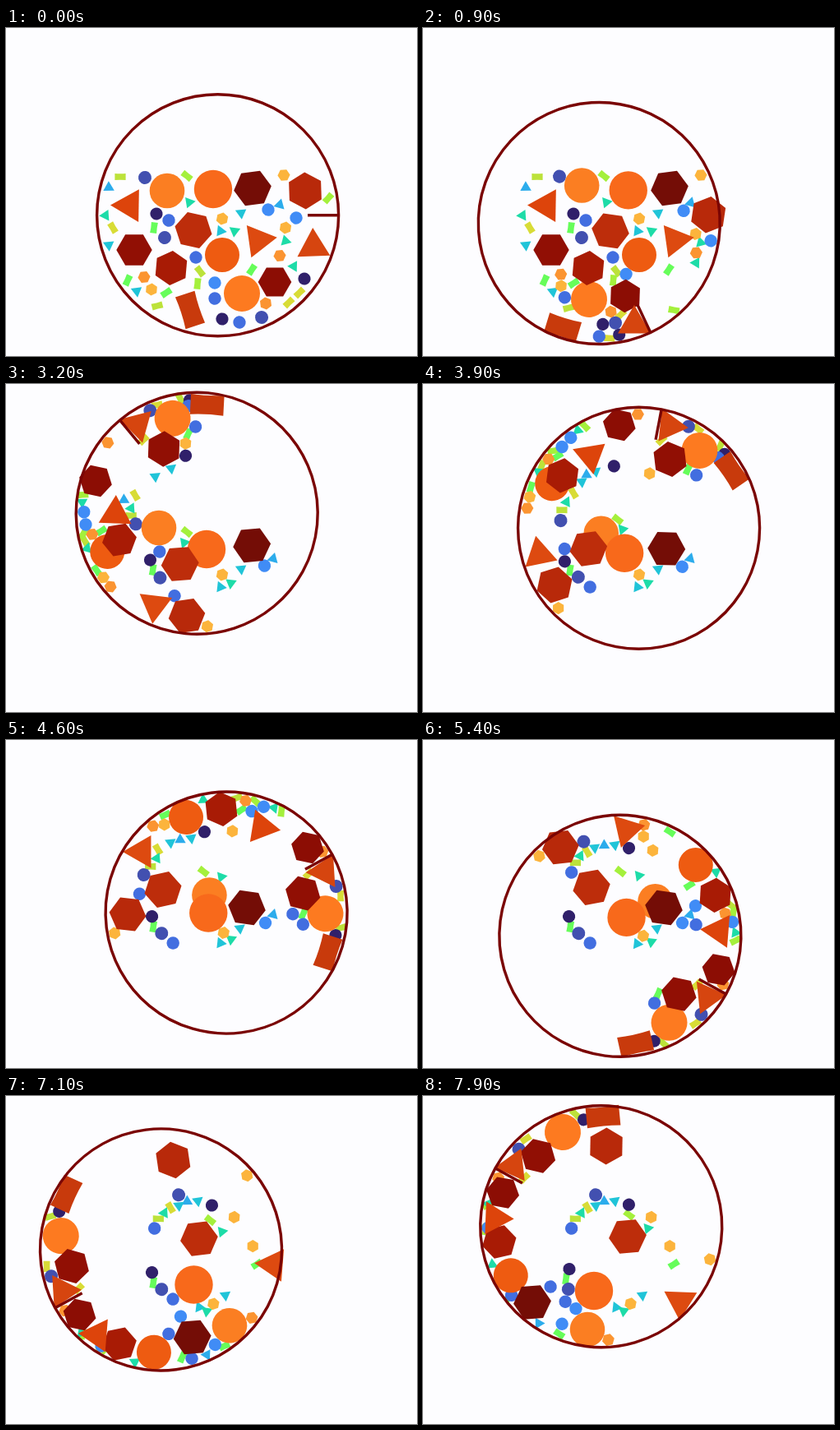
Write an HTML page that moves like this. It is 500 by 399 pixels and loops after 8 s.

```html
<!DOCTYPE html>
<html lang="en">
<head>
<meta charset="utf-8">
<title>Rotating drum</title>
<style>
html, body { margin: 0; width: 100%; height: 100%; overflow: hidden; background: #fdfdff; }
svg { display: block; width: 100vw; height: 100vh; }
</style>
</head>
<body>
<svg viewBox="0 0 500 399">
  <g id="bodies"></g>
  <g id="drum" fill="none" stroke="#7a0403" stroke-width="3.4">
    <circle cx="257.6" cy="227.8" r="147"/>
    <path d="M367 227.8H404"/>
  </g>
</svg>
<script>
const DURATION = 8, FRAME = 0.1, SUBSTEPS = 5; // seconds
const SPIN = 72; // degrees per second
const PIVOT = { x: 228.3, y: 198.5 };
const ORBIT = 41.5, INNER = 145.3, PADDLE = [110, 146];
const RAD = Math.PI / 180;

const clamp = (v, lo, hi) => Math.min(hi, Math.max(lo, v));
const wrap = (v, span) => v - span * Math.round(v / span);
const mix = (a, b, k) => a + (b - a) * k;
const around = (c, r, deg) => ({ x: c.x + r * Math.cos(deg * RAD), y: c.y + r * Math.sin(deg * RAD) });
const drumCentre = t => around(PIVOT, ORBIT, 45 + SPIN * t);

let seed = 7;
function random() {
  seed = seed * 16807 % 2147483647;
  return seed / 2147483647;
}

function polar(p) {
  const dx = p.x - PIVOT.x, dy = p.y - PIVOT.y;
  return { r: Math.hypot(dx, dy), deg: Math.atan2(dy, dx) / RAD };
}

// Turns a point with the drum.
function carry(p, seconds) {
  const { r, deg } = polar(p), turn = SPIN * seconds;
  return { ...around(PIVOT, r, deg + turn), a: p.a + turn };
}

// ---- shapes ----
function polygon(n, r) {
  const points = Array.from({ length: n }, (_, i) => {
    const p = around({ x: 0, y: 0 }, r, i * 360 / n);
    return p.x.toFixed(2) + ' ' + p.y.toFixed(2);
  });
  return 'M' + points.join('L') + 'Z';
}

// reach: radius of the circle that stands for the shape in collisions
const ball = r => ({ d: `M${-r} 0A${r} ${r} 0 1 1 ${r} 0A${r} ${r} 0 1 1 ${-r} 0Z`, symmetry: 360, reach: r });
const hex = r => ({ d: polygon(6, r), symmetry: 60, reach: r * 0.93 });
const tri = r => ({ d: polygon(3, r), symmetry: 120, reach: r * 0.65 });
function bar(l) {
  const w = l * 0.61, p = l * 0.1;
  return { d: `M${-l} ${-w}Q0 ${p - w} ${l} ${-w}V${w}Q0 ${w - p} ${-l} ${w}Z`, symmetry: 180, reach: l * 0.75 };
}

const layer = document.getElementById('bodies');
const drum = document.getElementById('drum');
const large = [], small = [];

function addPath(shape, color) {
  const el = document.createElementNS('http://www.w3.org/2000/svg', 'path');
  el.setAttribute('d', shape.d);
  el.setAttribute('fill', color);
  layer.append(el);
  return el;
}

// ---- large bodies: rest, get swept round the pivot, then ride with the drum ----
function makeLeg(from, to, symmetry) {
  const span = to.t - from.t, turn = SPIN * span;
  const p = polar(from), q = polar(to), gap = q.deg - p.deg;
  const sweep = gap - 360 * Math.ceil((gap - turn - 35) / 360);
  const swept = sweep > 4 && Math.min(p.r, q.r) > 50;
  const ride = swept ? sweep : 0;
  const share = swept ? clamp(Math.max(sweep / turn, Math.abs(q.r - p.r) / 60), 0.35, 1) : 1;
  const centre = drumCentre(from.t);
  const onWall = from.t > 0 && Math.hypot(from.x - centre.x, from.y - centre.y) > 105;
  const wait = onWall ? 0 : 1 - share;
  const twist = ride + (to.a === undefined ? 0 : wrap(to.a - from.a - ride, symmetry));
  to.a = from.a + twist;
  return t => {
    const k = clamp(((t - from.t) / span - wait) / share, 0, 1);
    const spot = swept
      ? around(PIVOT, mix(p.r, q.r, k), p.deg + sweep * k)
      : { x: mix(from.x, to.x, k), y: mix(from.y, to.y, k) };
    return { ...spot, a: from.a + twist * k };
  };
}

// Each key is [seconds, x, y, angle]; the angle is optional after the first.
function travel(shape, color, ...keys) {
  const stops = keys.map(([t, x, y, a]) => ({ t, x, y, a }));
  const legs = stops.slice(1).map((to, i) => makeLeg(stops[i], to, shape.symmetry));
  const last = stops[stops.length - 1];
  const at = t => t >= last.t ? carry(last, t - last.t) : legs[stops.findIndex(s => t < s.t) - 1](t);
  large.push({ shape, color, at, reach: shape.reach, path: [] });
}

// ---- small bodies: stay put until something pushes them ----
function scatter(shape, color, ...places) {
  for (const [x, y] of places) {
    small.push({ shape, color, x, y, a: random() * shape.symmetry, reach: shape.reach, path: [] });
  }
}

function push(body, from, distance, share = 1) {
  const dx = body.x - from.x, dy = body.y - from.y, d = Math.hypot(dx, dy) || 1;
  const overlap = (distance - d) * share;
  if (overlap <= 0) return;
  body.x += dx / d * overlap;
  body.y += dy / d * overlap;
}

function pushApart(a, b) {
  const before = { x: a.x, y: a.y }, distance = a.reach + b.reach;
  push(a, b, distance, 0.5);
  push(b, before, distance, 0.5);
}

function pushFromPaddle(body, centre, deg) {
  const dx = body.x - centre.x, dy = body.y - centre.y;
  const along = dx * Math.cos(deg * RAD) + dy * Math.sin(deg * RAD);
  push(body, around(centre, clamp(along, ...PADDLE), deg), body.reach + 2);
}

function wallGap(body, centre) {
  return INNER - body.reach - Math.hypot(body.x - centre.x, body.y - centre.y);
}

function keepInside(body, centre) {
  const gap = wallGap(body, centre);
  if (gap >= 0) return;
  const dx = body.x - centre.x, dy = body.y - centre.y, d = Math.hypot(dx, dy);
  body.x += dx / d * gap;
  body.y += dy / d * gap;
}

function advance(t, dt) {
  const before = drumCentre(t - dt), centre = drumCentre(t);
  const obstacles = large.map(b => ({ ...b.at(t), reach: b.reach }));
  for (const body of small) {
    if (wallGap(body, before) < 1) Object.assign(body, carry(body, dt));
  }
  for (let pass = 0; pass < 4; pass++) {
    small.forEach((body, i) => {
      for (const o of obstacles) push(body, o, o.reach + body.reach);
      for (const other of small.slice(i + 1)) pushApart(body, other);
      pushFromPaddle(body, centre, SPIN * t);
    });
    for (const body of small) keepInside(body, centre);
  }
}

function simulate() {
  const dt = FRAME / SUBSTEPS, frames = Math.round(DURATION / FRAME);
  for (let f = 0; f < frames; f++) {
    for (const body of large) body.path.push(body.at(f * FRAME));
    for (const body of small) body.path.push({ x: body.x, y: body.y, a: body.a });
    for (let s = 1; s <= SUBSTEPS; s++) advance(f * FRAME + s * dt, dt);
  }
}

// ---- scene ----
scatter(bar(6.6), '#bce23a', [139,181], [184,338], [236,296]);
scatter(bar(6.6), '#a4f03c', [220,180], [392,207], [233,311]);
scatter(bar(6.6), '#d8dc36', [130,243], [357,322], [344,334]);
scatter(bar(6.6), '#66fd5a', [180,243], [299,294], [148,307], [195,322]);

scatter(tri(7.8), '#2cacec', [125,194], [333,215]);
scatter(tri(7.8), '#20c4d8', [125,264], [286,225], [261,247], [159,320]);
scatter(tri(7.8), '#1ddca8', [121,228], [223,212], [278,247], [340,259], [350,290]);

scatter(hex(7.6), '#fcb43c', [338,179], [263,232], [340,243], [177,318]);
scatter(hex(7.6), '#fb9431', [333,277], [168,303], [316,335]);

scatter(ball(7.6), '#30206a', [183,226], [263,354], [363,305]);
scatter(ball(8), '#4250b0', [169,182], [193,255], [311,352]);
scatter(ball(7.7), '#426ee0', [198,234], [231,279], [254,329], [284,358]);
scatter(ball(7.7), '#408cf6', [254,310], [353,231], [319,221]);

travel(ball(21.3), '#fb7e22', [0,196,198,0], [3.2,186,175], [6.3,322,205], [7.9,200,284]);
travel(ball(23.2), '#f8691b', [0,252,196,0], [3.2,244,201], [6.3,249,222], [7.9,208,237]);
travel(ball(21), '#ee5b11', [0,263,276,0], [2.1,214,303], [4.6,219,94], [6.3,298,300]);
travel(ball(22), '#fd7a20', [0,287,323,0], [0.9,202,330], [2.1,71,201], [7.9,170,44]);

travel(hex(23), '#740d06', [0,300,195,53], [4.6,293,204,8], [6.3,298,240,55], [7.9,133,251]);
travel(hex(22.5), '#b8290a', [0,364,198,28], [2.1,286,265,5], [3.2,220,282], [4.6,148,212], [6.3,180,119,2], [7.9,223,61]);
travel(hex(23), '#bd2d0b', [0,228,246,12], [2.1,228,248,2], [4.6,191,182,48], [7.9,249,171,55]);
travel(hex(21.7), '#910f04', [0,156,270,0], [2.1,114,198], [3.2,192,79,32], [7.9,140,73]);
travel(hex(21.2), '#a81b05', [0,201,292,35], [2.1,172,251], [4.6,262,84,24], [6.3,267,330]);
travel(hex(20.3), '#8c0d04', [0,327,309,0], [0.9,246,326,32], [2.1,111,279,4], [3.2,109,118], [4.6,367,131]);

travel(tri(23), '#dd440b', [0,150,216,61], [3.2,133,158,32], [6.3,243,347,7]);
travel(tri(23), '#dd4a10', [0,307,258,112], [2.1,258,286,18], [3.2,181,269,97], [6.3,283,124,7], [7.9,313,250]);
travel(tri(23), '#d6450f', [0,374,266,28], [0.9,257,360,30]);
travel(bar(20.3), '#c83a0c', [0,224,343,72], [0.9,170,364,17], [2.1,59,159], [7.9,219,25]);

simulate();
const bodies = [...small, ...large];
for (const body of bodies) body.el = addPath(body.shape, body.color);

function draw(seconds) {
  const frame = Math.floor(seconds % DURATION / FRAME + 1e-6) % bodies[0].path.length;
  for (const { el, path } of bodies) {
    const { x, y, a } = path[frame];
    el.setAttribute('transform', `translate(${x.toFixed(2)} ${y.toFixed(2)}) rotate(${a.toFixed(2)})`);
  }
  drum.setAttribute('transform', `rotate(${SPIN * frame * FRAME} ${PIVOT.x} ${PIVOT.y})`);
}

let begin;
function tick(now) {
  if (begin === undefined) begin = now;
  draw((now - begin) / 1000);
  requestAnimationFrame(tick);
}
draw(0);
requestAnimationFrame(tick);
</script>
</body>
</html>
```
